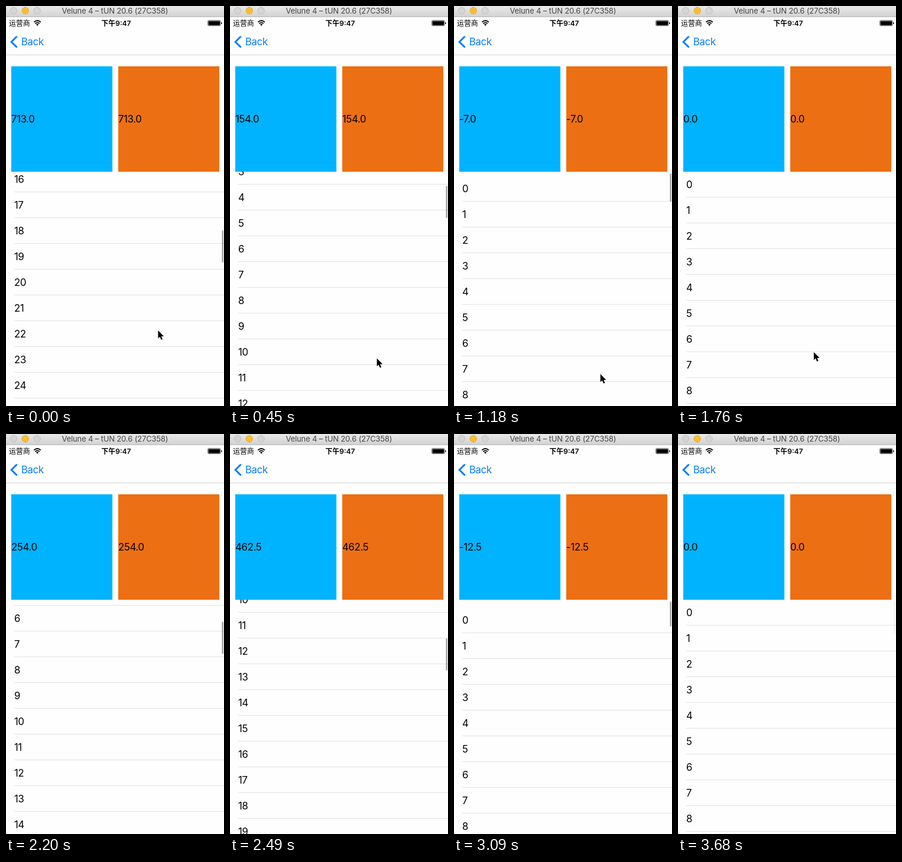
These frames come from a looping animation (372x683 px, 3.95 s). An HTML page:

```html
<!DOCTYPE html>
<html lang="zh">
<head>
<meta charset="utf-8">
<title>Scrolling list</title>
<style>
  html, body { margin: 0; width: 100%; height: 100%; overflow: hidden; background: #fff; }
  svg { display: block; width: 372px; height: 683px; }
  text { font: 17px Inter, "Noto Sans CJK SC", "Noto Sans CJK", sans-serif; letter-spacing: -.4px; }
  .title { font-size: 13px; letter-spacing: -.1px; fill: #444; text-anchor: middle; }
  .status { font-size: 12px; letter-spacing: 0; }
</style>
</head>
<body>
<svg viewBox="0 0 372 683">
  <defs>
    <linearGradient id="chrome" x2="0" y2="1">
      <stop stop-color="#e9e9e9"/><stop offset="1" stop-color="#d2d2d2"/>
    </linearGradient>
    <clipPath id="view"><rect y="283" width="372" height="400"/></clipPath>
  </defs>
  <rect width="372" height="683" fill="#fefefe"/>

  <rect width="372" height="18" fill="url(#chrome)"/>
  <rect y="18" width="372" height="1" fill="#b9b9b9"/>
  <g fill="#d5d5d5" stroke="#bfbfbf">
    <circle cx="13" cy="8" r="5.7"/>
    <circle cx="33" cy="8" r="5.7" fill="#fdbe2e" stroke="#e3a532"/>
    <circle cx="53" cy="8" r="5.7"/>
  </g>
  <text class="title" x="186" y="12.7">Velune 4 – tUN 20.6 (27C358)</text>

  <text class="status" x="5" y="33.5">运营商</text>
  <g fill="none" stroke="#000" stroke-width="1.7">
    <path d="M47.6 27.6Q53.5 22.4 59.4 27.6M49.8 30Q53.5 26.7 57.2 30"/>
    <path d="M51.3 31.4Q53.5 29.7 55.7 31.4L53.5 33.8Z" fill="#000" stroke="none"/>
  </g>
  <text class="status" x="188" y="33.5" text-anchor="middle" font-weight="600" style="font-weight:600">下午9:47</text>
  <rect x="344.5" y="24.7" width="21.5" height="9" rx="1.6" fill="#fff" stroke="#000" stroke-width=".7"/>
  <rect x="345.5" y="25.7" width="19.5" height="7" rx=".8"/>
  <path d="M367 27.5Q368.6 28 368.6 29.2T367 31Z"/>

  <path d="M18.7 51.7L9.2 61.2L18.7 70.7" fill="none" stroke="#087cff" stroke-width="3"/>
  <text x="26" y="67" fill="#087cff">Back</text>
  <rect y="83" width="372" height="1" fill="#d3d3d4"/>

  <g clip-path="url(#view)"><g id="rows"></g></g>

  <rect x="9" y="103" width="172.5" height="180" fill="#00b3ff"/>
  <rect x="191.5" y="103" width="172.5" height="180" fill="#ed6f13"/>
  <text class="offset" x="9" y="199"></text>
  <text class="offset" x="191.5" y="199"></text>

  <rect id="bar" x="368.4" width="2.6" rx="1.3"/>
  <path id="cursor" d="M0 0V13.6L3.1 10.8L5.3 16L7.7 15L5.5 9.9H9.8Z" stroke="#fff" stroke-width="1.2" paint-order="stroke"/>
</svg>
<script>
const LOOP = 3950, ROW = 44, TOP = 283;
const rowsEl = document.getElementById('rows');
const bar = document.getElementById('bar');
const cursor = document.getElementById('cursor');
const labels = document.querySelectorAll('.offset');

// Scroll offset at each screen refresh: fling, rest, drag, fling, bounce
const offsets = [
  713, 553, 345, 154, 22, -5.5, -6, -6.5, -7,
  -2.5, -.5, 0, 0,
  26, 122, 254, 374, 462.5,
  338, 168, 24, -12.5, -4.5, -.5, 0, 0
];
const barAlpha = { 11: .15, 12: 0, 25: .04 };
// Pointer: step, x, y
const pointerKeys = [[0, 259.5, 554], [5, 245.8, 627.5], [8, 249.8, 628.5], [12, 231.8, 591], [14, 231, 545]];

// Refreshes come in three evenly spaced runs of eight
const steps = [0];
for (const [from, to] of [[150, 1180], [1330, 2350], [2490, 3530]])
  for (let i = 0; i < 8; i++) steps.push(from + (to - from) * i / 7 - 8);
steps.push(3680);

let html = '';
for (let i = 0; i < 66; i++) {
  const y = TOP + i * ROW;
  html += `<text x="14" y="${y + 28}">${i}</text>` +
    `<rect x="14" y="${y + ROW - 1}" width="358" height="1" fill="#e2e2e4"/>`;
}
rowsEl.innerHTML = html;

function pointerAt(k) {
  const i = pointerKeys.findIndex(key => key[0] >= k);
  if (i < 0) return null;
  const b = pointerKeys[i], a = pointerKeys[Math.max(0, i - 1)];
  const u = b === a ? 0 : (k - a[0]) / (b[0] - a[0]);
  const ease = u * u * (3 - 2 * u);
  return [a[1] + (b[1] - a[1]) * ease, a[2] + (b[2] - a[2]) * ease];
}

function draw(time) {
  const k = steps.filter(s => s <= time).length - 1;
  const off = offsets[k];
  rowsEl.setAttribute('transform', `translate(0 ${Math.ceil(-off)})`);
  labels.forEach(el => el.textContent = off.toFixed(1));

  bar.setAttribute('y', 286 + .136 * Math.max(0, off));
  bar.setAttribute('height', 55 + Math.min(0, off));
  bar.setAttribute('fill-opacity', barAlpha[k] ?? .35);

  const p = pointerAt(k);
  cursor.style.display = p ? '' : 'none';
  if (p) cursor.setAttribute('transform', `translate(${p})`);
}

const start = performance.now();
function tick() {
  draw((performance.now() - start) % LOOP);
  requestAnimationFrame(tick);
}
tick();
</script>
</body>
</html>
```
